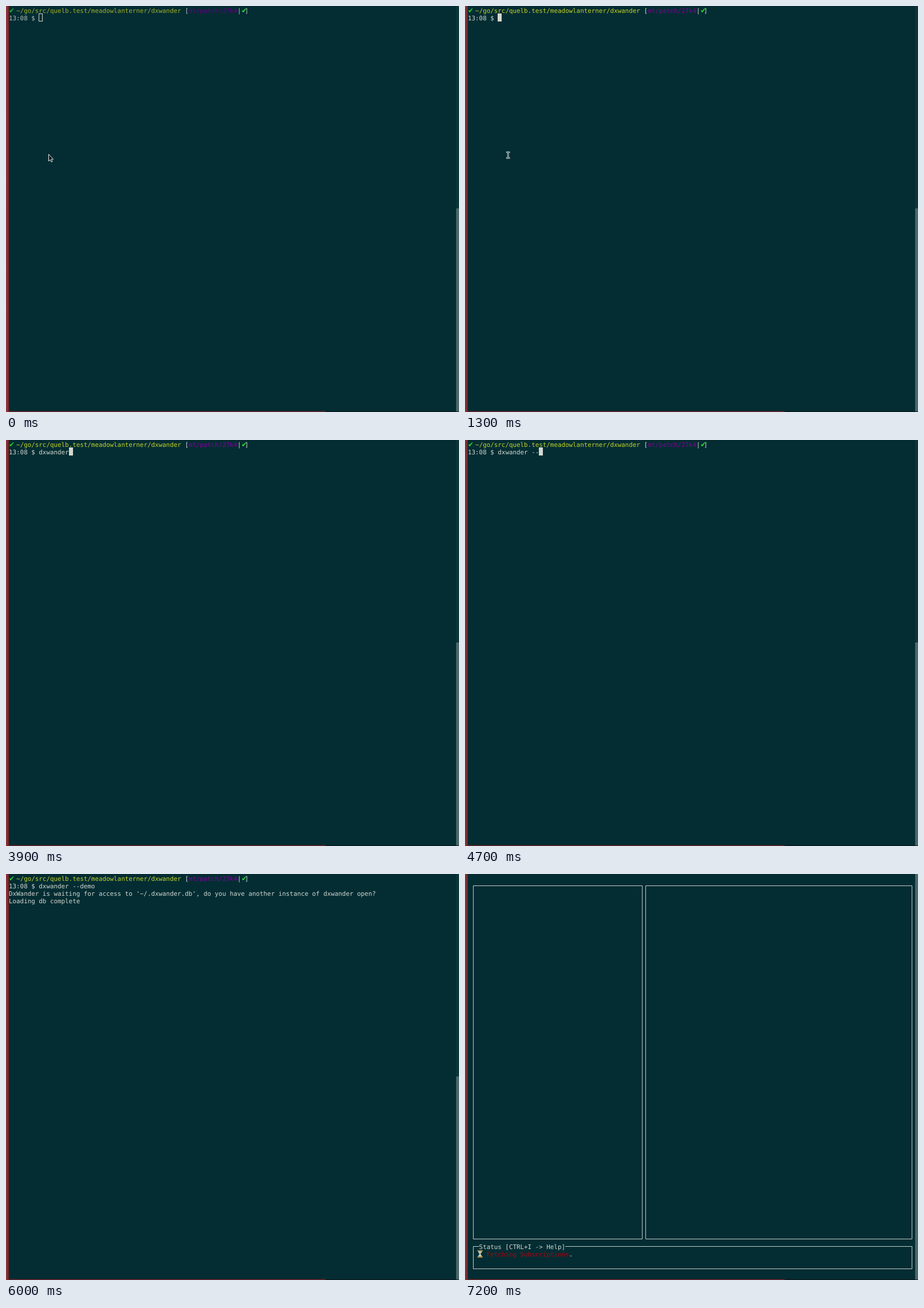
Write an HTML page that moves like this. It is 791 px wide and 708 px high and loops after 8000 ms.

```html
<!DOCTYPE html>
<html lang="en">
<head>
<meta charset="utf-8">
<title>Terminal session</title>
<style>
  html, body { margin: 0; width: 100%; height: 100%; overflow: hidden; background: #032d33; }
  svg {
    display: block; width: 791px; height: 708px;
    --text: #d3d7cf; --path: #c3d32a; --branch: #85009c; --tick: #1fd82a; --edge: #943438;
  }
  svg.idle { --text: #b4bdb6; --path: #a2b02a; --branch: #650082; --tick: #16bd30; --edge: #9e383c; }
  text {
    font: 10.86px "DejaVu Sans Mono", monospace;
    fill: var(--text); white-space: pre; text-rendering: geometricPrecision;
  }
  .path { fill: var(--path); }
  .branch { fill: var(--branch); }
  .tick { font: 12px "DejaVu Sans", sans-serif; fill: var(--tick); }
  .bright { fill: #22e22c; }
  .busy { fill: #b0000c; }
  .frame { fill: none; stroke: #c4cecb; }
  .pointer { stroke: #e8eaea; stroke-width: 1; fill: #10191b; }
  .hidden { visibility: hidden; }
</style>
</head>
<body>
<svg id="stage" class="idle" viewBox="0 0 791 708">
  <defs>
    <linearGradient id="shade">
      <stop offset="0" stop-color="#000" stop-opacity="0"/>
      <stop offset="1" stop-color="#000" stop-opacity=".3"/>
    </linearGradient>
  </defs>
  <rect width="791" height="708" fill="#032d33"/>
  <rect width="791" height="1" fill="#08262b"/>
  <rect y="706.5" width="791" height="1.5" fill="#0b1c20"/>
  <rect y="706.5" width="558" height="1.5" fill="#6a2429"/>
  <rect width="5" height="708" style="fill:var(--edge)"/>
  <rect width="5" height="708" fill="url(#shade)"/>
  <rect x="786" width="5" height="707" fill="#0b3538"/>
  <rect id="thumb" x="786" width="5" fill="#4a6869"/>

  <g id="shell">
    <text class="tick" x="5" y="12">✔</text>
    <text class="path" x="18.1" y="12">~/go/src/quelb.test/meadowlanterner/dxwander</text>
    <text x="312.4" y="12">[</text>
    <text class="branch" x="318.9" y="12">mt/patch/27k4</text>
    <text x="403.9" y="12">|</text>
    <text x="417" y="12">]</text>
    <text class="tick bright" x="411" y="12">✔</text>
    <text id="prompt" x="5" y="25.1"></text>
    <g id="output">
      <text x="5" y="38.2">DxWander is waiting for access to '~/.dxwander.db', do you have another instance of dxwander open?</text>
      <text x="5" y="51.3">Loading db complete</text>
    </g>
    <rect id="cursor" stroke="#d3d7cf"/>
    <path id="arrow" class="pointer" d="M74.5 258.5V270.5L77.2 268L79 272L81 271.1L79.2 267.2H82.6Z"/>
    <g id="beam">
      <path d="M72 255h2.3l.9 .8l.9-.8h2.3M75.2 255.5v9M72 265h2.3l.9-.8l.9 .8h2.3" fill="none" stroke="#e4e8e6" stroke-width="2.6"/>
      <path d="M72.6 255h1.8l.8 .8l.8-.8h1.8M75.2 255.5v9M72.6 265h1.8l.8-.8l.8 .8h1.8" fill="none" stroke="#15292c" stroke-width=".9"/>
    </g>
  </g>

  <g id="panels">
    <path class="frame" d="M14.5 20.5H309.5V636.5H14.5ZM315.5 20.5H780.5V636.5H315.5ZM24.5 649.5H14.5V688.5H780.5V649.5H175"/>
    <text x="24.6" y="653.9">Status [CTRL+I -&gt; Help]</text>
    <g id="status">
      <path d="M23 658C23 661 25.3 661.5 25.3 662.6S23 664.5 23 667.5H29.5C29.5 664.5 27.1 663.7 27.1 662.6S29.5 661 29.5 658Z" fill="#b9cdd2"/>
      <path d="M24 659.8H28.5L26.2 662.5ZM23.5 667.3L26.2 664.6L29 667.3Z" fill="#e2b66b"/>
      <path d="M21.5 657H31M21.5 668H31" stroke="#a5814f" stroke-width="1.8"/>
      <text class="busy" x="37.7" y="667">Fetching Subscriptions</text>
      <text x="181.6" y="667">.</text>
    </g>
  </g>
</svg>
<script>
  const LOOP = 8000, COL = 6.54, ROW = 13.1;
  const COMMAND = "dxwander --demo";
  // [time in ms, characters typed by then]
  const KEYS = [[2100, 1], [2700, 2], [3000, 3], [3200, 4], [3300, 5], [3500, 6], [3900, 8],
    [4400, 9], [4500, 10], [4700, 11], [4900, 12], [5000, 14], [5200, 15]];

  const el = id => document.getElementById(id);
  const show = (id, on) => el(id).classList.toggle("hidden", !on);
  const set = (node, attrs) => {
    for (const name in attrs) node.setAttribute(name, attrs[name]);
  };

  function draw(t) {
    const focused = t >= 1300, running = t >= 5500, ui = t >= 6200;
    const typed = KEYS.reduce((n, [at, count]) => t >= at ? count : n, 0);

    el("stage").classList.toggle("idle", !focused);
    el("prompt").textContent = "13:08 $ " + COMMAND.slice(0, typed);
    el("shell").style.display = ui ? "none" : "";
    el("panels").style.display = ui ? "" : "none";
    show("output", running);
    show("arrow", t < 200);
    show("beam", t >= 200 && t < 2200);
    show("status", t >= 7200);
    set(el("thumb"), ui ? { y: 0, height: 707 } : { y: 353, height: 354 });

    const col = running ? 0 : 8 + typed, row = running ? 4 : 1;
    set(el("cursor"), {
      x: Math.round(5 + col * COL) + .5, y: Math.round(1 + row * ROW) - .5,
      width: 6, height: 13, fill: focused ? "#d3d7cf" : "none"
    });
    show("cursor", !(t >= 1900 && t < 2100) && t < 6000);
  }

  const start = performance.now();
  function tick() {
    draw((performance.now() - start) % LOOP);
    requestAnimationFrame(tick);
  }
  tick();
</script>
</body>
</html>
```
